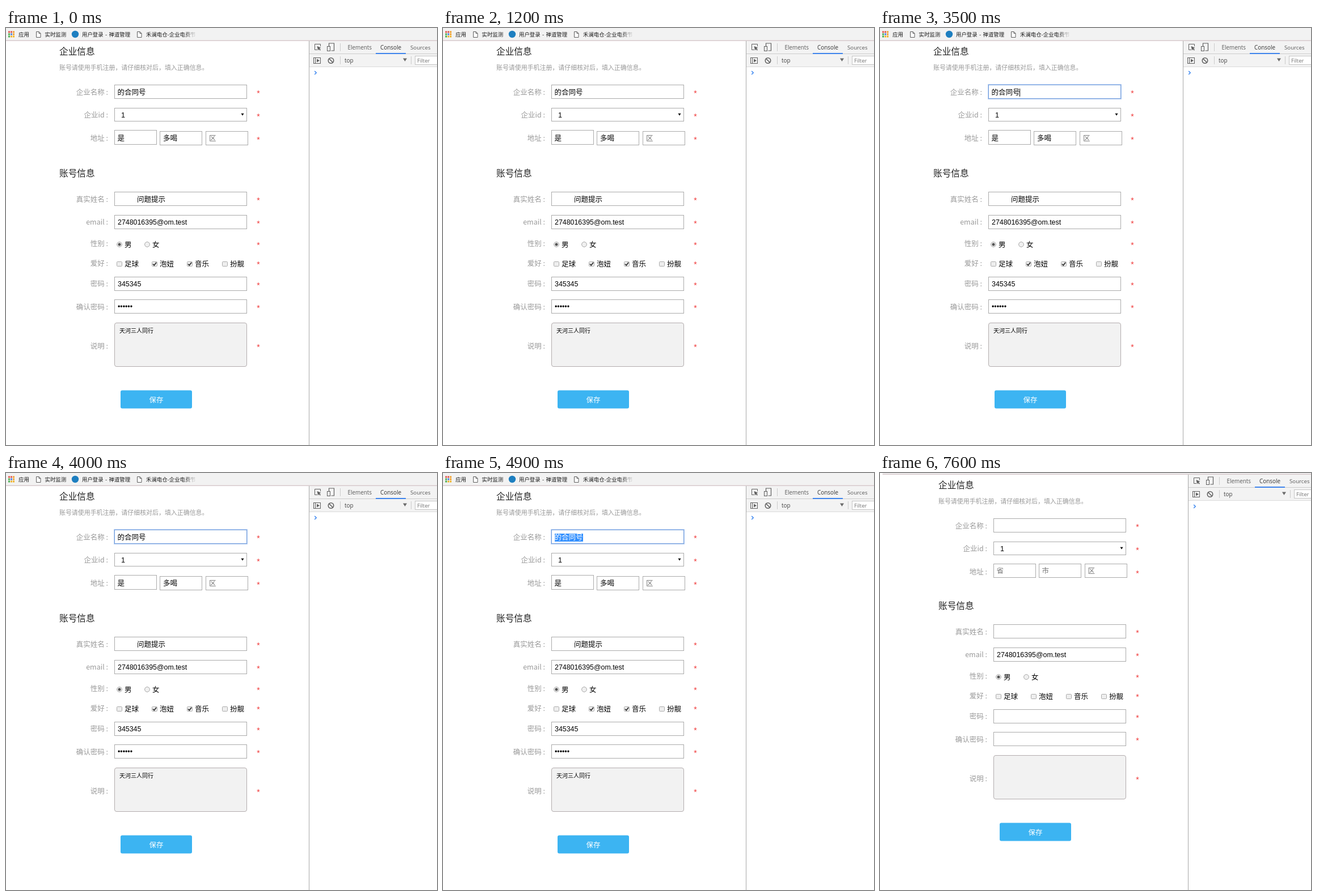
An HTML page for the animation above (8 s loop, 760x736 px).

```html
<!DOCTYPE html>
<html lang="zh">
<head>
<meta charset="utf-8">
<title>表单重置</title>
<style>
  html, body { margin: 0; width: 100%; height: 100%; overflow: hidden; background: #fff; }
  svg { display: block; }
  text { font-family: "Noto Sans CJK SC", "Noto Sans CJK", sans-serif; white-space: pre; }
  .arial { font-family: "Liberation Sans", Arial, sans-serif; }
  .tools { font-family: "Open Sans", "Noto Sans", sans-serif; }
  .title { font-weight: 300; }
</style>
</head>
<body>
<svg id="stage" width="760" height="736" viewBox="0 0 760 736">
  <defs>
    <linearGradient id="fade" gradientUnits="userSpaceOnUse" x1="312" y1="0" x2="337" y2="0">
      <stop offset="0" stop-color="#1a1a1a"/>
      <stop offset="1" stop-color="#1a1a1a" stop-opacity="0"/>
    </linearGradient>
  </defs>
</svg>
<script>
const LOOP = 8000;
const GREY = '#999', INK = '#000', EDGE = '#ababab', HINT = '#757575', ICON = '#5f5f5f', TAB = '#1a1a1a';

function el(parent, name, attrs = {}, content) {
  const node = document.createElementNS('http://www.w3.org/2000/svg', name);
  for (const key in attrs) node.setAttribute(key, attrs[key]);
  if (content !== undefined) node.textContent = content;
  parent.appendChild(node);
  return node;
}
const group = parent => el(parent, 'g');
const fillBox = (g, x, y, width, height, fill, rx = 0) =>
  el(g, 'rect', { x, y, width, height, fill, rx });
const frame = (g, x, y, w, h, stroke = EDGE, fill = '#fff', rx = 0) =>
  el(g, 'rect', { x: x + .5, y: y + .5, width: w - 1, height: h - 1, stroke, fill, rx });
const path = (g, d, stroke, width = 1, fill = 'none') =>
  el(g, 'path', { d, stroke, 'stroke-width': width, fill });
// y is the middle of the glyphs
const text = (g, x, y, size, fill, str, cls = '', anchor = 'start') =>
  el(g, 'text', { x, y: y + size * .37, 'font-size': size, fill, class: cls, 'text-anchor': anchor }, str);

const stage = document.getElementById('stage');
const page = group(stage);
const upper = group(page);
const lower = group(page);

// bookmarks bar
const bar = group(page);
fillBox(bar, -4.5, 0, 800, 21, '#f2f2f2');
fillBox(bar, -4.5, 21, 800, 1, '#e6dfe0');
fillBox(bar, -4.5, 22, 800, 1, '#d6c9cc');
['#e2574c', '#e2574c', '#f0a030', '#4caf50', '#4a86e8', '#f0a030', '#4caf50', '#f0b429', '#f0b429']
  .forEach((c, i) => fillBox(bar, 4 + i % 3 * 4, 5.5 + (i / 3 | 0) * 4, 3, 3, c));
text(bar, 22, 11.5, 9.5, TAB, '应用');
for (const x of [53, 231]) path(bar, `M${x + .5} 6.5h4.5l3 3v7h-7.5zM${x + 5} 6.5v3h3`, ICON, 1, '#fff');
text(bar, 68.5, 11.5, 9.4, TAB, '实时监测');
el(bar, 'circle', { cx: 122, cy: 11, r: 6.2, fill: '#1e7fc0' });
text(bar, 134, 11.5, 9.4, TAB, '用户登录');
text(bar, 175, 11.5, 9.4, TAB, '-');
text(bar, 181.5, 11.5, 9.4, TAB, '禅道管理');
text(bar, 247, 11.5, 9.4, 'url(#fade)', '禾澜电仓-企业电费节');

// developer tools
const tools = group(page);
fillBox(tools, 535, 23, 260, 45, '#f3f3f3');
fillBox(tools, 535, 45, 260, 1, '#cccccc');
fillBox(tools, 535, 68, 260, 1, '#dadada');
fillBox(tools, 534, 23, 1, 760, '#a8a8a8');
path(tools, 'M549 38.5h-4.5v-10h10v4', ICON);
path(tools, 'M548.5 32l7 3-2.7 1.2 2.2 2.4-1.2 1.2-2.2-2.4-1.3 2.4z', 'none', 0, ICON);
path(tools, 'M569.5 32v-5h9v13h-5', ICON, 1.2);
frame(tools, 566, 32, 6, 9, ICON, '#f3f3f3');
frame(tools, 542, 52, 13, 11, ICON, '#f3f3f3');
path(tools, 'M545.5 52v11', ICON);
path(tools, 'M548 54.5l5 3-5 3z', 'none', 0, ICON);
el(tools, 'circle', { cx: 573, cy: 57.5, r: 4.7, fill: 'none', stroke: ICON, 'stroke-width': 1.6 });
path(tools, 'M569.7 54.2l6.6 6.6', ICON, 1.6);
for (const [x, y] of [[589, 27], [589, 50], [714, 50]]) fillBox(tools, x, y, 1, 14, '#ccc');
text(tools, 602.5, 34, 9.9, '#5a5a5a', 'Elements', 'tools');
text(tools, 660, 34, 9.9, '#333', 'Console', 'tools');
text(tools, 713, 34, 9.7, '#5a5a5a', 'Sources', 'tools');
fillBox(tools, 652, 44, 53, 2, '#3f84ec');
text(tools, 597, 57.2, 9.9, '#444', 'top', 'tools');
path(tools, 'M700 53.5h7l-3.5 5.5z', 'none', 0, '#6a6a6a');
frame(tools, 721, 49, 60, 16, '#c4c4c4');
text(tools, 725, 57.5, 9.6, HINT, 'Filter', 'tools');
path(tools, 'M544.2 76l3 3-3 3', '#3b86ef', 1.5);

// form pieces
function label(g, str, y, starY) {
  text(g, 180, y, 12.5, GREY, str + ' :', '', 'end');
  text(g, 445, starY + 4, 14, '#f03c3c', '*', 'arial', 'middle');
}
const field = (g, y, h = 25) => frame(g, 191, y, 234, h);

text(upper, 94, 41, 15.7, '#222', '企业信息', 'title');
text(upper, 94, 70, 10.95, GREY, '账号请使用手机注册，请仔细核对后，填入正确信息。');
label(upper, '企业名称', 113, 111);
label(upper, '企业id', 153, 152);
label(upper, '地址', 194.5, 193);
field(upper, 100);
const select = field(upper, 141, 24);
text(upper, 203, 153, 12.5, INK, '1', 'arial');
path(upper, 'M414.5 150.8h5l-2.5 4z', 'none', 0, INK);

text(lower, 94, 256, 15.7, '#222', '账号信息', 'title');
[['真实姓名', 302, 300], ['email', 342, 341], ['性别', 380.5, 379], ['爱好', 415, 413],
 ['密码', 451.5, 450], ['确认密码', 492, 490], ['说明', 561, 559]]
  .forEach(([str, y, starY]) => label(lower, str, y, starY));
[289, 330, 439, 479].forEach(y => field(lower, y));
text(lower, 197, 342, 12.4, INK, '2748016395@om.test', 'arial');
['男', '女'].forEach((str, i) => {
  const x = 200 + i * 49;
  el(lower, 'circle', { cx: x, cy: 382, r: 4.4, fill: '#f0f0f0', stroke: '#a8a8a8' });
  if (!i) el(lower, 'circle', { cx: x, cy: 382, r: 2.5, fill: '#555' });
  text(lower, x + 9, 382, 12.5, INK, str);
});
['足球', '泡妞', '音乐', '扮靓'].forEach((str, i) => {
  const x = 195 + i * 62;
  frame(lower, x, 412, 10, 9, '#ababab', '#eeeeee', 1);
  text(lower, x + 14, 416, 12.5, INK, str);
});
frame(lower, 191, 520, 234, 78, '#b3adae', '#f2f2f2', 3.5);
fillBox(lower, 202, 639.5, 126, 32, '#3cb4f2', 3);
text(lower, 265, 656, 12.5, '#fff', '保存', '', 'middle');

// entered values, cleared by the reload
const filled = group(upper);
frame(filled, 191, 180, 75, 26);
frame(filled, 271, 182, 75, 25);
frame(filled, 352, 182, 75, 25);
text(filled, 196.5, 194, 12.5, INK, '是');
text(filled, 277, 194.5, 12.5, INK, '多喝');
text(filled, 358, 194.5, 12.5, HINT, '区');
const marked = fillBox(filled, 197, 107, 50, 14, 'none');
const company = text(filled, 196.5, 113.8, 12.5, INK, '的合同号');

const filledLower = group(lower);
text(filledLower, 231, 302, 12.5, INK, '问题提示');
for (const x of [257, 319]) path(filledLower, `M${x + 2} 416.5l2.2 2.3 4-5`, '#333', 1.8);
text(filledLower, 197, 451, 12.4, INK, '345345', 'arial');
text(filledLower, 197, 491.5, 12.4, INK, '••••••', 'arial');
text(filledLower, 200, 534, 10, INK, '天河三人同行');

const blank = group(upper);
['省', '市', '区'].forEach((str, i) => {
  const x = 191 + i * 80.5 | 0;
  frame(blank, x, 180, 75, 25);
  text(blank, x + 5.5, 192.5, 12.5, HINT, str);
});

const ring = group(upper);
frame(ring, 190, 99, 236, 27, '#b4cdf3', 'none');
frame(ring, 191, 100, 234, 25, '#759fdc', 'none');
const caret = fillBox(upper, 246, 107, 1, 14, '#000');

// each step lists only what it switches on
const steps = [
  [0, {}],
  [1000, { hover: 1 }],
  [1200, {}],
  [2600, { focus: 1, caret: 1 }],
  [3000, { focus: 1 }],
  [3500, { focus: 1, caret: 1 }],
  [3600, { focus: 1, caret: 1, hover: 1 }],
  [3700, { focus: 1, caret: 1 }],
  [4000, { focus: 1 }],
  [4300, { focus: 1, mark: ['#3390ff', '#fff'] }],
  [5600, { mark: ['#c8c8c8', '#3c3c3c'] }],
  [7600, { reset: 1 }]
];
const show = (node, on) => node.setAttribute('visibility', on ? 'visible' : 'hidden');

function draw(s) {
  const [back, ink] = s.mark || ['none', INK];
  marked.setAttribute('fill', back);
  company.setAttribute('fill', ink);
  select.setAttribute('stroke', s.hover ? '#808080' : EDGE);
  show(ring, s.focus);
  show(caret, s.caret);
  show(filled, !s.reset);
  show(filledLower, !s.reset);
  show(blank, s.reset);
  page.setAttribute('transform', s.reset ? 'translate(9 -20)' : '');
  lower.setAttribute('transform', s.reset ? 'translate(0 -2)' : '');
}

let current;
function tick() {
  const t = performance.now() % LOOP;
  const step = steps.filter(([at]) => at <= t).pop();
  if (step !== current) draw((current = step)[1]);
  requestAnimationFrame(tick);
}
tick();
</script>
</body>
</html>
```
